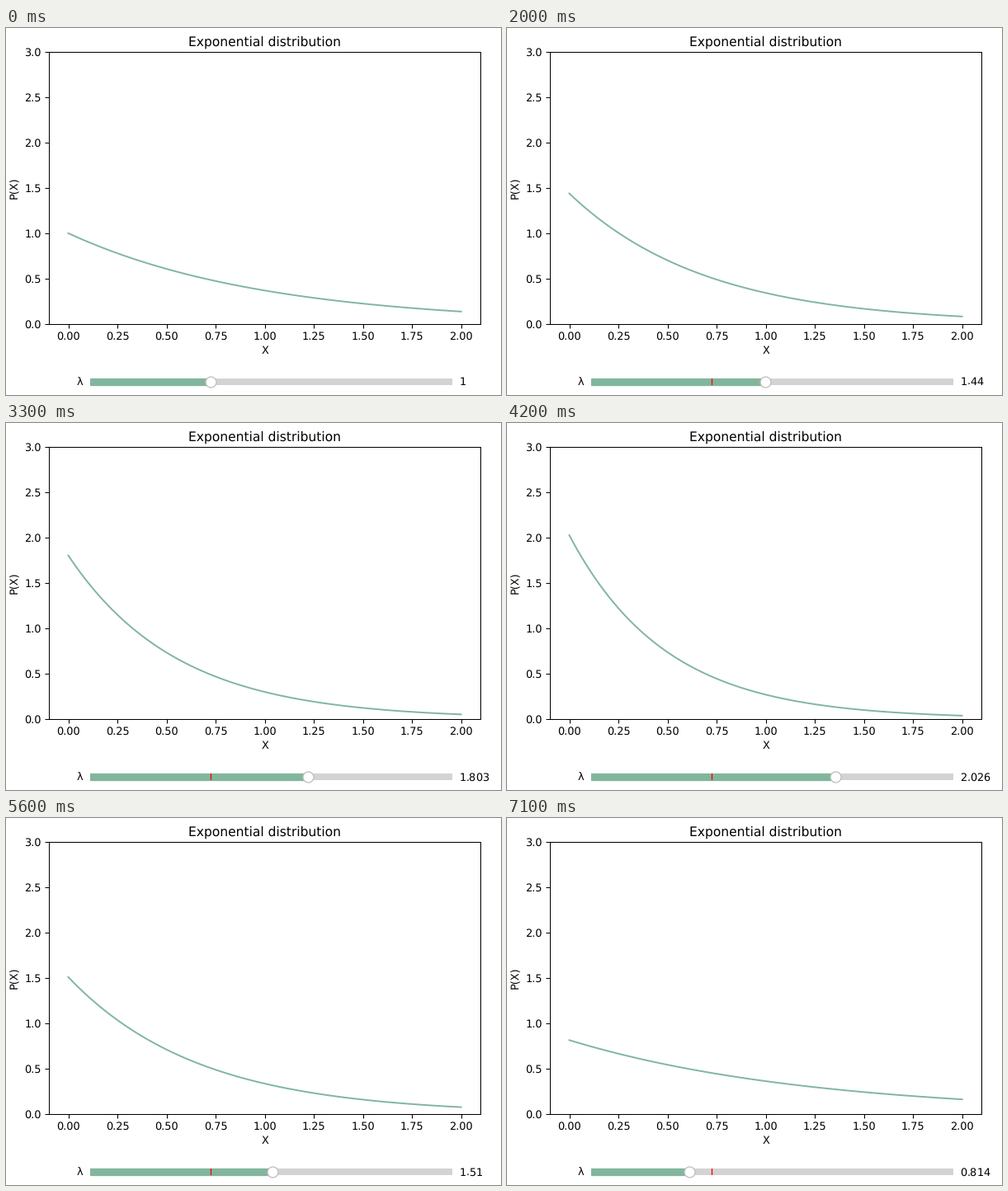
Recreate the animation shown at these times as a matplotlib script. Size 600 by 445 pixels, loop 7.2 s.

```python
import numpy as np
import matplotlib.pyplot as plt
from matplotlib.animation import FuncAnimation
from matplotlib.widgets import Slider

W, H, DPI = 600, 445, 93.2
GREEN = "#81b69d"
FRAMES, INTERVAL = 72, 100
TRACK, GRIP = 470, 0.45  # drag resolution in steps, pointer offset on the knob
LAMBDA_MAX = 3

# Pointer path: (tick, step along the track), straight drags in between
PATH = [(5, 155), (7, 154), (15, 190), (21, 232), (26, 255), (33, 282),
        (42, 317), (45, 327), (49, 317), (56, 236), (65, 155), (71, 127)]
START = PATH[0][0]


def refreshes(tick):
    """Whether the dragged value is redrawn at this tick or holds."""
    if tick < 17:
        return tick % 2 == 1
    if 28 <= tick <= 45:
        return tick % 6 != 2
    if 45 < tick < 49:  # rest at the far end
        return False
    return tick % 3 != 0


def rate_at(tick):
    if tick < START:
        return 1
    while not refreshes(tick):
        tick -= 1
    step = round(float(np.interp(tick, *zip(*PATH))))
    return (step + GRIP) / TRACK * LAMBDA_MAX


def add_axes(left, top, right, bottom):
    """Axes placed by pixel edges measured from the top left."""
    return fig.add_axes([left / W, 1 - bottom / H,
                         (right - left) / W, (bottom - top) / H])


def density(rate):
    return rate * np.exp(-rate * x)


plt.rcParams["text.hinting"] = "none"
fig = plt.figure(figsize=(W / DPI, H / DPI), dpi=DPI)
ax = add_axes(51.7, 29.1, 575.4, 358.7)
x = np.linspace(0, 2, 100)
curve, = ax.plot(x, density(1), color=GREEN)
ax.set(title="Exponential distribution", xlabel="X", ylabel="P(X)",
       xlim=(-0.1, 2.1), ylim=(0, 3))

slider = Slider(add_axes(102.2, 421.3, 540.7, 437.3), "λ", 0, LAMBDA_MAX,
                valinit=1, color=GREEN)
slider.drawon = False


def draw(tick):
    rate = rate_at(tick)
    curve.set_ydata(density(rate))
    slider.set_val(rate)
    return curve,


anim = FuncAnimation(fig, draw, frames=FRAMES, interval=INTERVAL,
                     repeat=True, repeat_delay=0)
plt.show()
```
